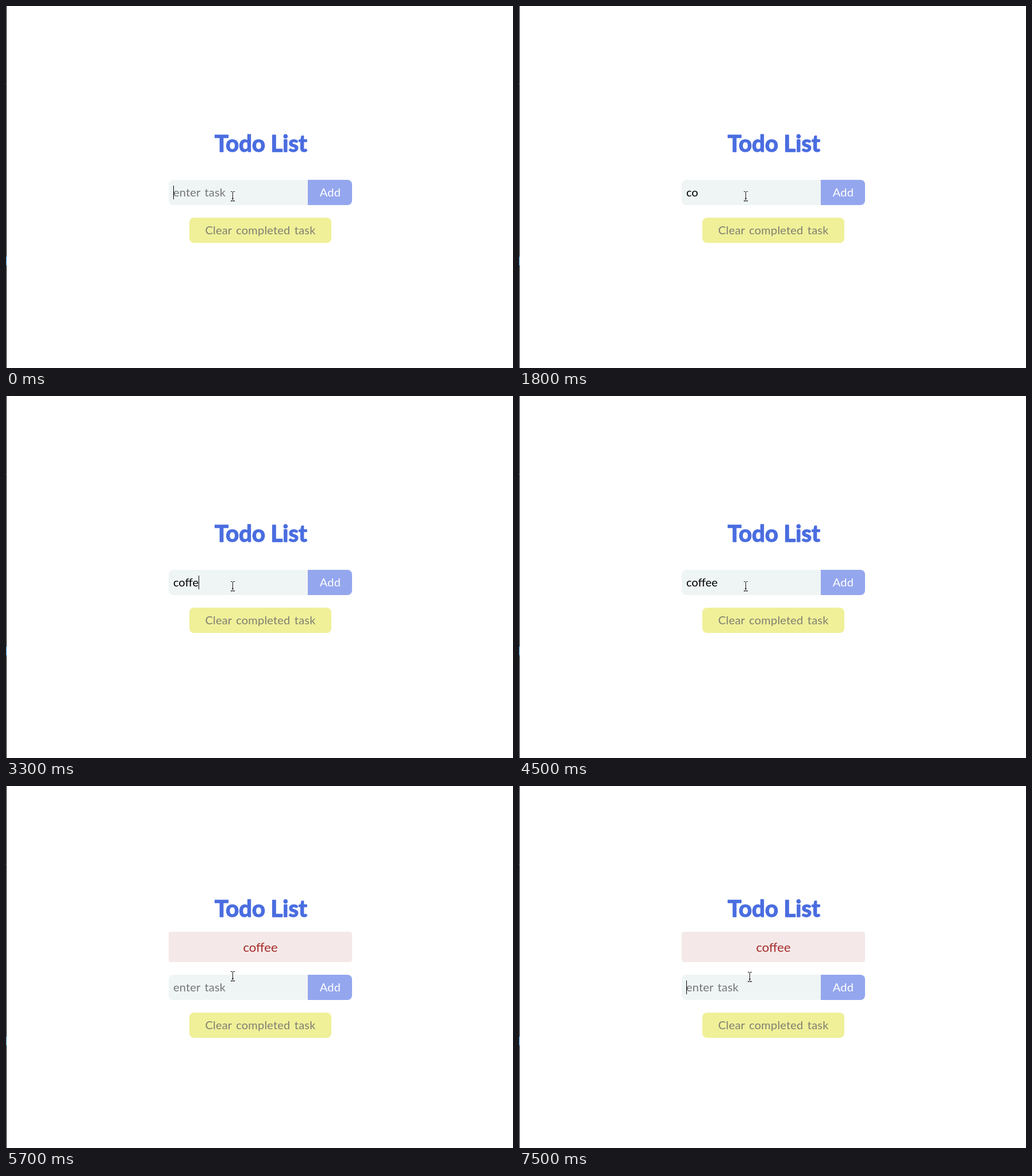
Recreate the animation shown at these times as an HTML page. Size 882 by 631 pixels, loop 8000 ms.

```html
<!DOCTYPE html>
<html lang="en">
<head>
<meta charset="utf-8">
<title>Todo List</title>
<style>
  html, body { margin: 0; width: 100%; height: 100%; overflow: hidden; background: #fff; }
  svg { display: block; font: 20px Lato, sans-serif; }
  .label { letter-spacing: .2px; word-spacing: 2px; }
  .middle { text-anchor: middle; }
  #title { font-size: 40px; font-weight: 700; fill: #4a6de0; stroke: #4a6de0; stroke-width: 1.4; stroke-linejoin: round; }
</style>
</head>
<body>
<svg width="882" height="631" viewBox="0 0 882 631">
  <path d="M0 0h1v631h-1z"/>
  <path d="M0 136h1v1h-1z" fill="#555"/>
  <path d="M0 437h1v15h-1z" fill="#2a80c0"/>

  <text id="title" class="middle" x="443.5" y="254">Todo List</text>

  <g id="item">
    <rect x="283" y="254" width="319" height="53" rx="4" fill="#f4e9e8"/>
    <text class="middle" x="442.5" y="289" font-size="22" fill="#a52a2a">coffee</text>
  </g>

  <g id="form">
    <path d="M525 303h-234a8 8 0 0 0-8 8v28a8 8 0 0 0 8 8h234z" fill="#eff5f5"/>
    <path d="M525 303h69a8 8 0 0 1 8 8v28a8 8 0 0 1-8 8h-69z" fill="#94a6ee"/>
    <text class="label middle" x="564" y="332" fill="#fff">Add</text>
    <text id="placeholder" class="label" x="291" y="332" fill="#757575">enter task</text>
    <text id="entry" x="291" y="332"></text>
    <rect id="caret" y="313" width="1" height="24"/>
    <rect x="319" y="369" width="247" height="44" rx="8" fill="#f0f099"/>
    <text class="label middle" x="442.5" y="398" fill="#7f7f72">Clear completed task</text>
  </g>

  <g id="pointer" fill="none">
    <path d="M391 323.5h2.5l1 1 1-1h2.5M394.5 324v15M391 339.5h2.5l1-1 1 1h2.5" stroke="#fff" stroke-width="2.6"/>
    <path d="M391 340.5h7" stroke="#999"/>
    <path d="M391 323.5h2.5l1 1 1-1h2.5M394.5 324v15M391 339.5h2.5l1-1 1 1h2.5M393 335.5h3" stroke="#111"/>
  </g>
</svg>
<script>
  const LOOP = 8000, ADDED = 4600, POINTER_MOVE = 6500;
  const word = 'coffee';
  const keyTimes = [1000, 1200, 2500, 2600, 3300, 3900];
  const caretX = [291, 301, 312, 318, 324, 335, 346];
  const caretToggles = [500, 1000, 1800, 2400, 3200, 3300, 4500, 5100, 5700, 6300, 6900, 7500];

  const el = id => document.getElementById(id);
  const show = (id, on) => el(id).setAttribute('visibility', on ? 'visible' : 'hidden');
  const move = (id, x, y) => el(id).setAttribute('transform', `translate(${x} ${y})`);
  const passed = (times, t) => times.filter(time => time <= t).length;

  function draw() {
    const t = performance.now() % LOOP;
    const added = t >= ADDED;
    const typed = added ? 0 : passed(keyTimes, t);

    el('entry').textContent = word.slice(0, typed);
    show('placeholder', typed === 0);
    el('caret').setAttribute('x', caretX[typed]);
    show('caret', passed(caretToggles, t) % 2 === 0);

    show('item', added);
    move('title', 0, added ? -26 : 0);
    move('form', 0, added ? 26 : 0);
    move('pointer', ...(t >= POINTER_MOVE ? [7, 1] : [0, 0]));
    requestAnimationFrame(draw);
  }
  draw();
</script>
</body>
</html>
```
